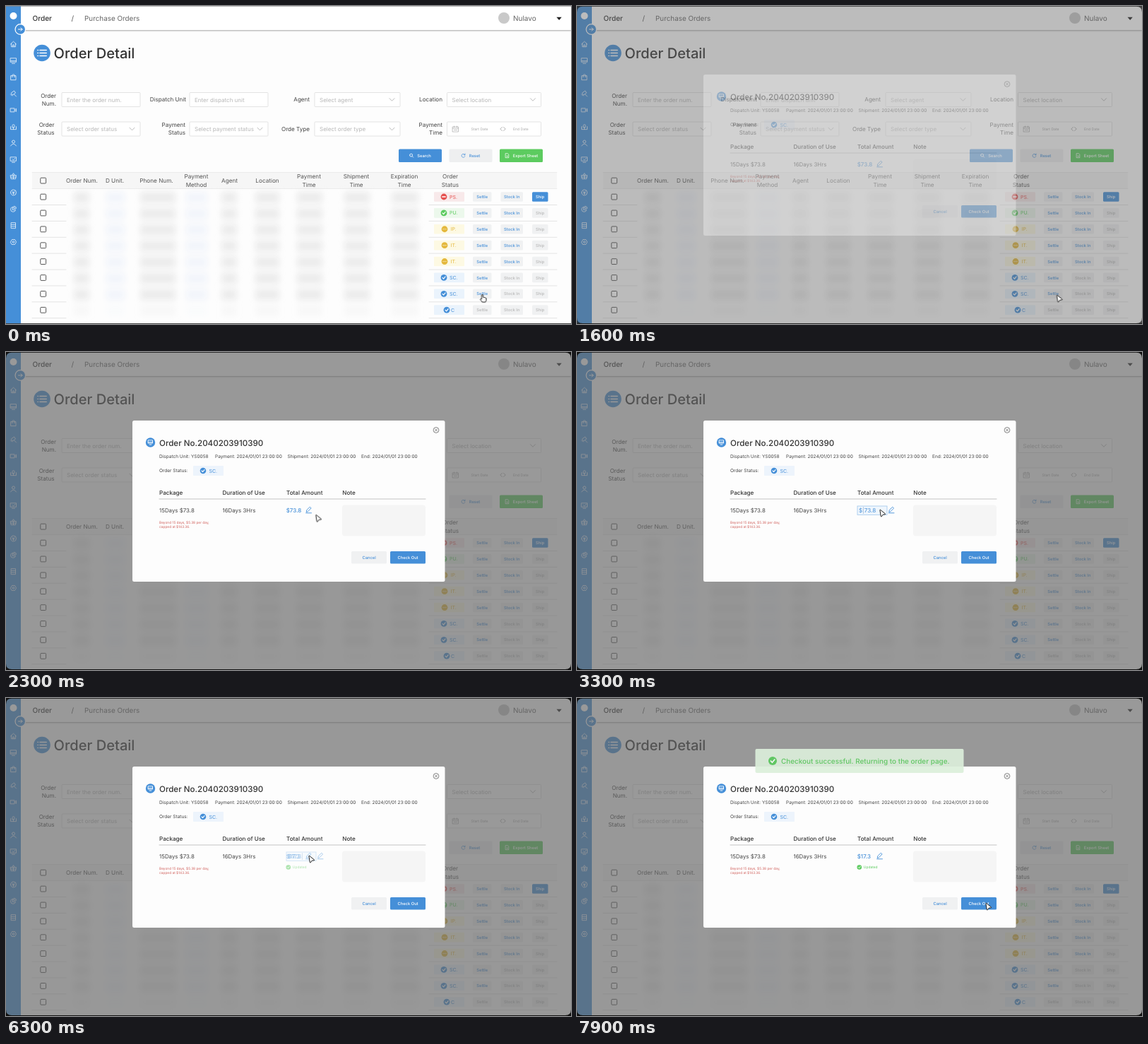
An HTML page for the animation above (8 s loop, 800 by 450 pixels).

```html
<!DOCTYPE html>
<html lang="en">
<head>
<meta charset="utf-8">
<title>Order Detail</title>
<style>
  html, body { margin: 0; width: 100%; height: 100%; overflow: hidden; background: #fdfdfd; }
  svg text { font-family: Inter, Roboto, sans-serif; white-space: pre; text-rendering: geometricPrecision; }
  #stage { display: block; width: 100vw; height: 100vh; }
  .anim { animation: 8s linear infinite; }
  #dim { animation-name: dim; }
  #corners { animation-name: corners; }
  #modal { animation-name: modal; }
  #before { animation-name: before; }
  #edit { animation-name: edit; }
  #after { animation-name: after; }
  #reel { animation-name: reel; animation-timing-function: step-end; }
  .caret { animation: caret 8s step-end infinite; }
  #toast { animation-name: toast; }
  #cursor { animation-name: travel; }
  #hand { animation-name: hand; animation-timing-function: step-end; }
  #arrow { animation-name: arrow; animation-timing-function: step-end; }

  @keyframes dim {
    0%, 18.75% { opacity: 0; animation-timing-function: cubic-bezier(.1, .6, .4, 1); }
    23.75%, 100% { opacity: 1; }
  }
  @keyframes corners {
    0%, 19% { opacity: 0; }
    20.5%, 100% { opacity: 1; }
  }
  @keyframes modal {
    0%, 19% { opacity: 0; animation-timing-function: ease-out; }
    23.5%, 100% { opacity: 1; }
  }
  @keyframes before {
    0%, 37.5% { opacity: 1; }
    39.5%, 100% { opacity: 0; }
  }
  @keyframes edit {
    0%, 37.5% { opacity: 0; }
    39.5%, 77.5% { opacity: 1; }
    80%, 100% { opacity: 0; }
  }
  @keyframes after {
    0%, 77.5% { opacity: 0; }
    80%, 100% { opacity: 1; }
  }
  @keyframes reel {
    0% { transform: translateY(0); }
    63.5% { transform: translateY(-14px); }
    64.8% { transform: translateY(-28px); }
    66% { transform: translateY(-42px); }
    67.3% { transform: translateY(-56px); }
    68.5%, 100% { transform: translateY(-70px); }
  }
  @keyframes caret {
    0% { opacity: 1; }
    47.3% { opacity: 0; }
    54.8%, 100% { opacity: 1; }
  }
  @keyframes toast {
    0%, 95% { opacity: 0; transform: translateY(-6px); animation-timing-function: ease-out; }
    98.75%, 100% { opacity: .92; transform: none; }
  }
  @keyframes travel {
    0%, 4.5% { transform: translate(674.5px, 408px); animation-timing-function: ease-in-out; }
    15%, 21.9% { transform: translate(679.5px, 409px); animation-timing-function: cubic-bezier(.5, 0, .1, 1); }
    31.3%, 79.5% { transform: translate(429px, 223px); animation-timing-function: cubic-bezier(.4, 0, .2, 1); }
    88.75%, 100% { transform: translate(579px, 290px); }
  }
  @keyframes hand { 0% { opacity: 1; } 20%, 100% { opacity: 0; } }
  @keyframes arrow { 0% { opacity: 0; } 20%, 100% { opacity: 1; } }
</style>
</head>
<body>
<svg id="stage" viewBox="0 0 800 450" preserveAspectRatio="none"></svg>
<script>
const BLUE = '#458fd8', GREEN = '#5ccb5f', RED = '#e5504f', YELLOW = '#e4b83c';
const INK = '#444', FAINT = '#b7b7b7';

const rect = (x, y, w, h, fill, r = 0, extra = '') =>
  `<rect x="${x}" y="${y}" width="${w}" height="${h}" rx="${r}" fill="${fill}" ${extra}/>`;
const circle = (x, y, r, fill, extra = '') =>
  `<circle cx="${x}" cy="${y}" r="${r}" fill="${fill}" ${extra}/>`;
const text = (x, y, size, str, fill = INK, anchor = 'start', weight = 400) =>
  `<text x="${x}" y="${y}" font-size="${size}" fill="${fill}" text-anchor="${anchor}" font-weight="${weight}">${str}</text>`;
const line = (x, y, d, color, width = 1) =>
  `<path transform="translate(${x} ${y})" d="${d}" fill="none" stroke="${color}" stroke-width="${width}" stroke-linecap="round" stroke-linejoin="round"/>`;
const group = (id, body) => `<g id="${id}" class="anim">${body}</g>`;

const check = (x, y, r, color) =>
  circle(x, y, r, color) + line(x, y, `M${-r * .45} 0L${-r * .1} ${r * .38}L${r * .48} ${-r * .32}`, '#fff', r * .27);

function button(x, y, w, h, label, fill, color, shift = 0, size = 5.8) {
  return rect(x, y, w, h, fill, 1.5) + text(x + w / 2 + shift, y + h / 2 + 2.1, size, label, color, 'middle', 500);
}

function sidebar() {
  const icons = [
    'M-4 0L0-3.8L4 0M-3 -1V3.7H3V-1M-1 3.7V1H1V3.7',
    'M-4-3.5H4V2H-4ZM-2 4H2M-4 .3H4',
    'M-3.5-2H3.5V4H-3.5ZM-1.7 0V-3Q0-5 1.7-3V0',
    'M-3-1L1-4L3-1L-1 2ZM1 1L4 4M-4 1L-2 3',
    'M-4-2.5H1.5V2.5H-4ZM2-.5L4-2V2L2 .5',
    'M-1.5-1.5A1.5 1.5 0 1 1 1.5-1.5V1H-1.5ZM-4 0V4H4V0M0 1V4',
    'M-2-2A2 2 0 1 1 2-2A2 2 0 1 1-2-2M-4 4Q0-2 4 4',
    'M-4-3.5H4V2H-4ZM-2 4H2M-1.5-.7L0 .7L2.5-2',
    'M-4-1H4L3 4H-3ZM-2-1L0-4L2-1M-3.5 1.5H3.5M0-1V4',
    'M-4 0A4 4 0 1 1 4 0A4 4 0 1 1-4 0M-1.7-2L0 0L1.7-2M0 0V2.5M-1.5 .6H1.5',
    'M-1-3A3.5 3.5 0 1 0 3 1H-1ZM1-4A3 3 0 0 1 4-1H1Z',
    'M-3-4H3V4H-3ZM-3-1.3H3M-3 1.3H3',
    'M-4 0L-2-3.5H2L4 0L2 3.5H-2ZM-1.3 0A1.3 1.3 0 1 1 1.3 0A1.3 1.3 0 1 1-1.3 0'
  ];
  return rect(0, 0, 21, 450, BLUE) + circle(10.5, 14, 5, '#fff') +
    icons.map((d, i) => line(10.5, 54 + i * 23.33, d, '#e4effa', .85)).join('') +
    circle(20.3, 33, 7.3, BLUE, 'stroke="#fff" stroke-width="1.2"') +
    line(20.3, 33, 'M-2.8 0H2.8M.7-2.1L2.8 0L.7 2.1', '#fff', 1);
}

function header() {
  return rect(21, 0, 779, 34, '#fff', 0, 'filter="url(#shadow)"') +
    text(37.5, 20.5, 10.1, 'Order', '#333', 'start', 500) + text(92.5, 20.5, 10, '/', '#555') +
    text(111, 20.5, 9.9, 'Purchase Orders', '#666') +
    circle(705, 17, 8, '#c9c9c9') + text(718, 21, 10, 'Nulavo', '#666') +
    '<path d="M779.5 15.8H786.8L783.2 20Z" fill="#222"/>' +
    circle(51, 66.5, 11.8, BLUE) +
    [-4, 0, 4].map(d => line(51, 66.5 + d, 'M-6 0H-5.6M-3 0H6.2', '#fff', 1.6)).join('') +
    text(67.5, 73.7, 20.1, 'Order Detail', '#333', 'start', 500);
}

function field(x, y, w, hint, labels, isSelect, labelEnd) {
  const mid = y + 10;
  const label = labels.map((s, i) =>
    text(labelEnd, mid + 2.8 + (i - (labels.length - 1) / 2) * 11, 8.1, s, INK, 'end')).join('');
  return rect(x, y, w, 20, '#fff', 1, 'stroke="#dcdcdc" stroke-width=".8"') + label +
    text(x + 7, mid + 3, 8, hint, FAINT) +
    (isSelect ? line(x + w - 11.5, mid, 'M-3.5-1.8L0 1.8L3.5-1.8', '#aaa', .8) : '');
}

function form() {
  return field(79, 122.5, 111, 'Enter the order num.', ['Order', 'Num.'], false, 71) +
    field(260, 122.5, 111, 'Enter dispatch unit', ['Dispatch Unit'], false, 255) +
    field(437, 122.5, 121, 'Select agent', ['Agent'], true, 430) +
    field(624.5, 122.5, 133, 'Select location', ['Location'], true, 618) +
    field(79, 164, 111, 'Select order status', ['Order', 'Status'], true, 68.5) +
    field(260, 164, 111, 'Select payment status', ['Payment', 'Status'], true, 254) +
    field(437, 164, 121, 'Select order type', ['Orde Type'], true, 430) +
    field(624.5, 164, 133, '', ['Payment', 'Time'], false, 618) +
    line(636.5, 174, 'M-4-3H4V4H-4ZM-4-.8H4M-2-4V-2.5M2-4V-2.5M-2 1.5H2', '#aaa', .7) +
    text(658.5, 176, 5.1, 'Start Date', '#aaa') + text(718, 176, 5.1, 'End Date', '#aaa') +
    line(703.5, 174, 'M-1-2.5L-3.8 0L-1 2.5M1-2.5L3.8 0L1 2.5', '#999', .7) +
    button(556, 202.5, 61, 18.5, 'Search', BLUE, '#fff', 5.5) +
    line(574, 211.5, 'M-2.4-.4A2 2 0 1 1 1.6-.4A2 2 0 1 1-2.4-.4M1.2 1.2L2.6 2.6', '#fff', .8) +
    button(627.5, 202.5, 61, 18.5, 'Reset', '#eeeff0', BLUE, 5.5) +
    line(647.5, 211.7, 'M2.3-1A2.5 2.5 0 1 0 2.4 1M2.5-2.7V-.9H.8', BLUE, .7) +
    button(699, 202.5, 61, 18.5, 'Export Sheet', GREEN, '#fff', 6) +
    line(709.5, 211.7, 'M-2-3H1L2.3-1.5V3H-2ZM-.7 0L1 1.7M1 0L-.7 1.7', '#fff', .7);
}

function table() {
  const columns = [
    [107.5, 'Order Num.'], [154, 'D Unit.'], [213, 'Phone Num.'], [269.5, 'Payment', 'Method'],
    [316.5, 'Agent'], [370, 'Location'], [429, 'Payment', 'Time'], [496, 'Shipment', 'Time'],
    [564, 'Expiration', 'Time'], [629, 'Order', 'Status']
  ];
  const states = {
    PS: [RED, '#f8e9ea'], PU: [GREEN, '#ecf8ec'], IP: [YELLOW, '#fdf9e3'],
    IT: [YELLOW, '#fdf9e3'], SC: [BLUE, '#eaf3fc'], C: [BLUE, '#eaf3fc']
  };
  const rows = ['PS', 'PU', 'IP', 'IT', 'IT', 'SC', 'SC', 'C'];
  const smudges = [[107, 22], [155, 26, 1], [215, 50], [270, 30, 1], [316, 22], [370, 34], [430, 36], [497, 36], [565, 38]];
  const box = y => rect(48.8, y - 3.8, 7.8, 7.8, '#fff', 1, 'stroke="#555" stroke-width="1"');

  let out = rect(37, 235.5, 743, 23, '#f6f6f6') +
    line(37, 235.5, 'M0 0H743M0 23H743', '#e6e6e6', .7) + box(247);
  for (const [x, ...names] of columns)
    names.forEach((s, i) => out += text(x, 250 + (i - (names.length - 1) / 2) * 12, 8.2, s, '#555', 'middle'));

  let blur = '';
  rows.forEach((code, i) => {
    const y = 270 + i * 22.88, [color, tint] = states[code];
    const iconX = code === 'C' ? 624 : color === YELLOW ? 621 : 620;
    smudges.forEach(([x, w, blue]) =>
      blur += rect(x - w / 2, y - 7, w, 16, blue ? '#edf2fb' : '#e3e3e3', 0, `opacity="${i === 7 ? .2 : .65}"`));
    out += box(y) + line(37, y + 11.5, 'M0 0H48M562 0H743', '#dedede', .8) + rect(606, y - 6.8, 43, 13.6, tint, 1);
    if (color === BLUE || color === GREEN) out += check(iconX, y, 4.4, color);
    else out += circle(iconX, y, 4.4, color) +
      line(iconX, y, color === RED ? 'M-2.2 0H2.2' : 'M-2 0H-2M0 0H0M2 0H2', '#fff', color === RED ? 1.5 : 1.1);
    out += text(code === 'C' ? 630 : color === YELLOW ? 629.5 : 628, y + 2.6, 7, code === 'C' ? 'C' : code + '.', color);
    out += button(661, y - 6.8, 26.5, 13.6, 'Settle', '#f0f1f2', i < 7 ? BLUE : FAINT) +
      button(700.5, y - 6.8, 31.5, 13.6, 'Stock In', '#f0f1f2', i < 5 ? BLUE : FAINT) +
      button(745, y - 6.8, 22.5, 13.6, 'Ship', i ? '#f0f1f2' : BLUE, i ? FAINT : '#fff');
  });
  return out + `<g filter="url(#blur)">${blur}</g>`;
}

const pencil = x => line(x, 223, 'M-3.2 3L-2.7 .6L1.8-3.7L3.6-2L-.9 2.5ZM-3.8 4.8H4', BLUE, .9);

function amount() {
  const caret = '<tspan class="caret" fill="#6b93bd" font-weight="300">|</tspan>';
  const values = ['$|73.8', '$|', '$1|', '$17|', '$17.|', '$17.3|'];
  const reel = values.map((s, i) => text(2, 10 + i * 14, 8.1, s.replace('|', caret), BLUE)).join('');
  return group('before', text(396.7, 227, 8, '$73.8', BLUE, 'start', 500) + pencil(428.5)) +
    group('edit', rect(397, 218, 42, 12.3, '#eff6fd', 0, 'stroke="#9fc5ec" stroke-width=".8"') +
      `<svg x="397" y="217" width="44" height="14" overflow="hidden">${group('reel', reel)}</svg>` + pencil(445)) +
    group('after', text(396.7, 227, 8, '$17.3', BLUE, 'start', 500) + pencil(428.5) +
      check(399.8, 239.5, 3.3, GREEN) + text(405.8, 241.3, 4.9, 'Updated', GREEN));
}

function modal() {
  const info = [[217, 'Dispatch Unit: YS0058'], [296, 'Payment: 2024/01/01 23:00:00'],
    [398.5, 'Shipment: 2024/01/01 23:00:00'], [503, 'End: 2024/01/01 23:00:00']];
  const heads = [[217, 'Package'], [306.5, 'Duration of Use'], [397, 'Total Amount'], [476.3, 'Note']];
  return rect(179, 97, 442.5, 228, '#fdfdfd', 2.5) +
    circle(609, 110.5, 3.9, 'none', 'stroke="#666" stroke-width=".8"') +
    line(609, 110.5, 'M-1.5-1.5L1.5 1.5M1.5-1.5L-1.5 1.5', '#666', .8) +
    circle(204.5, 128, 6.7, BLUE) + line(204.5, 127.5, 'M-3-2.7H3V1.6H-3ZM-1.4 3.6H1.4M-3 .2H3', '#fff', .9) +
    text(217, 133, 11.6, 'Order No.2040203910390', '#333', 'start', 500) +
    info.map(([x, s]) => text(x, 150.4, 6.5, s)).join('') +
    text(217, 170.2, 6.5, 'Order Status:') + rect(265, 161, 43, 14, '#edf4fc', 1) +
    check(279, 168, 4.3, BLUE) + text(287.5, 170.6, 7, 'SC.', BLUE) +
    heads.map(([x, s]) => text(x, 201.5, 8.1, s, '#333', 'start', 500)).join('') +
    line(217, 208, 'M0 0H377', '#aaa', .7) +
    text(217, 227, 7.9, '15Days $73.8') + text(306.5, 227, 7.9, '16Days 3Hrs') +
    text(217, 242.5, 4.8, 'Beyond 15 days, $5.38 per day,', '#d0605c') +
    text(217, 249, 4.8, 'capped at $143.36.', '#d0605c') +
    rect(476, 216.5, 118, 44, '#f5f5f5', 4) +
    button(489, 282, 50, 17.5, 'Cancel', '#f0f1f2', BLUE) +
    button(544, 282, 50, 17.5, 'Check Out', BLUE, '#fff') + amount();
}

const toast = rect(252.5, 72, 295, 34, '#dcefdb', 2) + check(277, 89, 6, GREEN) +
  text(289, 92.8, 9.93, 'Checkout successful. Returning to the order page.', GREEN, 'start', 500);

const cursorShape = d => `<path d="${d}" fill="#fff" stroke="#222" stroke-linejoin="round"/>`;
const cursor =
  group('hand', cursorShape('M-1 6.5V1Q0-.6 1 1V4.2Q2.2 3.6 2.7 4.6Q3.8 4.1 4.2 5.1Q5.4 4.8 5.5 6V8Q5.4 9.5 4.4 11H-.3Q-1.4 9.2-3 7.3Q-2.6 5.6-1 6.9Z')) +
  group('arrow', cursorShape('M.4 .2L7.6 6Q8 6.8 7 6.9L4.2 7.1L2.4 9.8Q1.6 10.6 1.3 9.5L-.1 .7Q-.1 0 .4 .2Z'));

document.getElementById('stage').innerHTML = `
  <defs>
    <filter id="blur" x="-5%" y="-5%" width="110%" height="110%"><feGaussianBlur stdDeviation="4"/></filter>
    <filter id="shadow" x="-5%" y="-20%" width="110%" height="150%">
      <feDropShadow dx="0" dy=".8" stdDeviation="1" flood-color="#000" flood-opacity=".4"/>
    </filter>
  </defs>` +
  rect(0, 0, 800, 450, '#fdfdfd') + header() + sidebar() + form() + table() +
  rect(0, 0, 800, .6, '#888') + rect(0, 449, 800, 1, '#444') +
  group('dim', rect(0, 0, 800, 450, 'rgba(100,100,100,.66)')) +
  group('corners', '<path fill="#111" fill-rule="evenodd" d="M0 0H800V450H0ZM8 .8H792Q800 .8 800 8.8V441Q800 449 792 449H8Q0 449 0 441V8.8Q0 .8 8 .8Z"/>') +
  group('modal', modal()) + group('toast', toast) + group('cursor', cursor);
</script>
</body>
</html>
```
